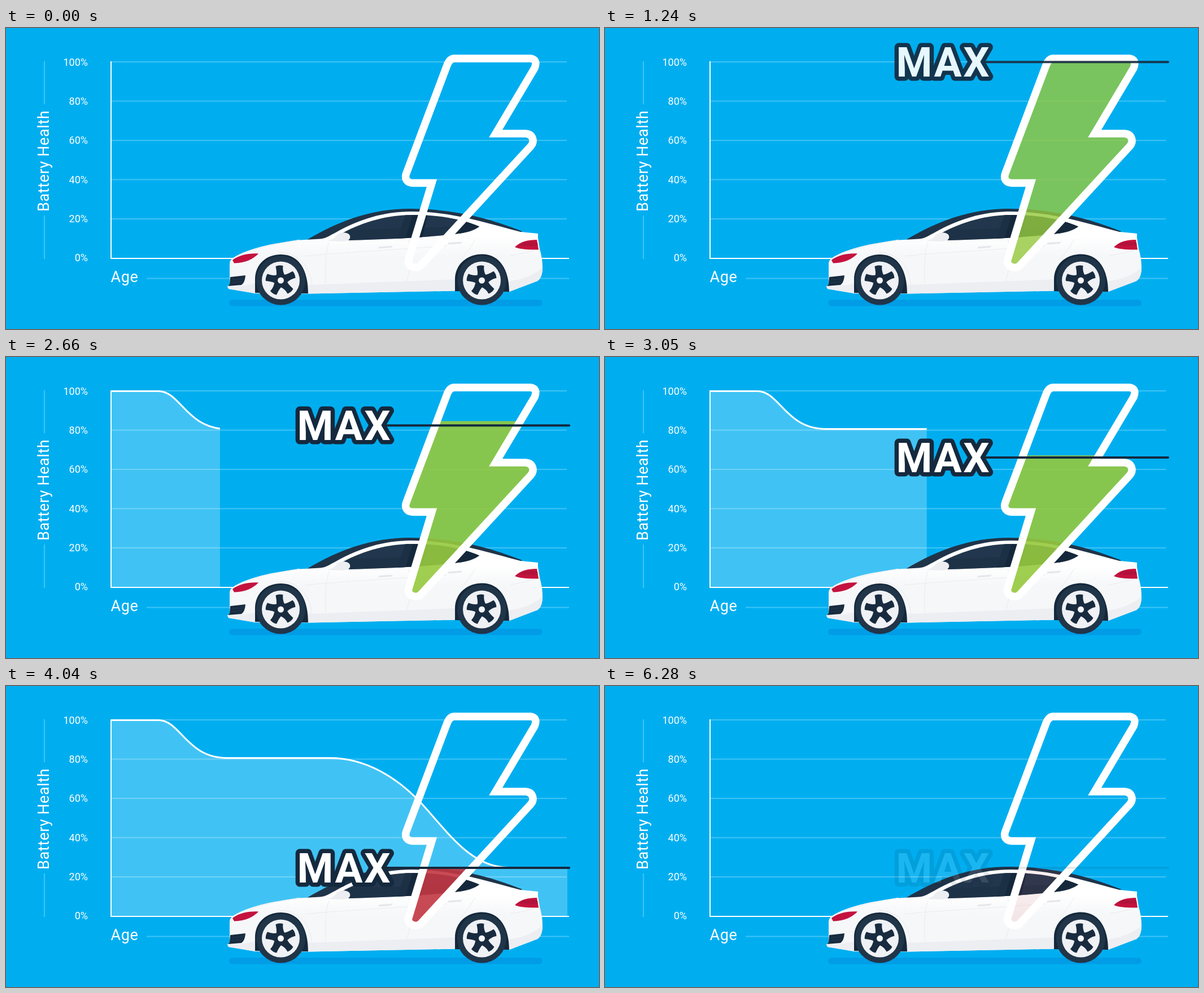
These frames come from a looping animation (1050x533 px, 6.31 s). An HTML page:

```html
<!DOCTYPE html>
<html lang="en">
<head>
<meta charset="utf-8">
<title>Battery Health by Age</title>
<style>
html, body { margin: 0; height: 100%; overflow: hidden; background: #00aef0; }
svg { display: block; width: 100%; height: 100%; font-family: Roboto, sans-serif; }
.title { font-size: 27px; letter-spacing: .6px; }
</style>
</head>
<body>
<svg viewBox="0 0 1050 533" fill="none">
  <defs>
    <path id="boltShape" d="M793 54H929Q942 56 936 71L867 187H920C934 188 936 202 929.5 209L735 420C727 429 709 422 713 410L754 274.5H721C710 274.5 705 267 709 257L781 66Q785 55 793 54Z"/>
    <path id="curve" d="M186 60.5H270C309 60.5 320 127.5 391 127.5H573C640 127.5 694 165 731 203C778 252 820 321.5 890 321.5H994"/>
    <clipPath id="reveal"><rect id="revealBox" y="40" height="368"/></clipPath>
    <clipPath id="level"><rect id="levelBox" x="690" width="270" height="500"/></clipPath>
    <clipPath id="glassClip"><use href="#glass"/></clipPath>
    <linearGradient id="paint" x2="0" y2="1">
      <stop offset=".3" stop-color="#fff"/><stop offset=".55" stop-color="#f6f7f9"/>
    </linearGradient>
    <g id="wheel">
      <circle r="43.5" fill="#213549"/>
      <circle r="33.5" fill="#eff1f4"/>
      <g id="blades" fill="#182b3f"><circle r="10.5"/></g>
      <circle r="5.500" fill="#f6f7f9"/>
    </g>
  </defs>

  <g id="grid" stroke="#fff" stroke-opacity=".25" stroke-width="2">
    <path d="M68 59V135M68 332V409M249 443.5H997"/>
  </g>
  <g id="labels" fill="#fff" font-size="18" text-anchor="end"></g>
  <text class="title" fill="#fff" x="185.500" y="450">Age</text>
  <text class="title" fill="#fff" transform="translate(76 325) rotate(-90)">Battery Health</text>

  <g id="chart" clip-path="url(#reveal)">
    <path id="area" fill="#fff" fill-opacity=".25"/>
    <use href="#curve" stroke="#fff" stroke-width="3"/>
  </g>
  <path stroke="#fff" stroke-width="2" d="M186 59V408H997"/>

  <!-- car -->
  <rect x="395" y="481" width="555" height="11.5" rx="5.75" fill="#009ce6"/>
  <path fill="#203449" d="M533 375C590 341 648 320 715 320C785 320 850 334 914 360L900 372L560 385Z"/>
  <path fill="url(#paint)" d="M396 455V418Q396 411 402 407C430 389 478 380 520 375.5L556 373.5C566 373 574 367 584 362C625 339 668 325 718 325C790 325 850 345 911 361L942 364V372L945 391Q950 408 950 424Q950 442 941 448L891 467L795 465.5L535 470.5L441 470L394 462L392 457Z"/>
  <path fill="#eceef2" d="M394 458L423 456L442 452V470L394 462L392 458ZM530 455L796 445V465.5L535 470.5ZM889 449C915 445 935 438 950 424Q950 442 941 448L891 467Z"/>
  <path id="glass" fill="#22374d" d="M596 363C635 342 677 331 720 331C770 331 808 339 838 351.5C831 358 815 363 797 364.5C735 372 670 374 607 376Z"/>
  <g clip-path="url(#glassClip)">
    <path fill="#172a3e" d="M590 358L850 350V380H590Z" opacity=".35"/>
    <path fill="#1c3045" d="M709 325H722L705 380H690Z"/>
    <path fill="#15283b" d="M722 325H748L735 380H705Z"/>
    <path fill="#15283b" d="M808 335L845 350L790 370Z"/>
  </g>
  <path fill="#eceef2" d="M568 377C577 375 581 373 585 367C591 360 607 361 609 368C611 376 602 378 594 378Z"/>
  <path stroke="#e9ebef" d="M572 380C565 397 566 420 566 453M713 374C720 400 718 424 709 449M520 375C470 383 430 393 410 405M530 404L560 401L780 386M831 374C824 386 817 397 805 410M893 403C914 400 930 396 944 391M542 462C541 424 521 399 486 397"/>
  <path fill="#e5e7eb" d="M661 387L685 385.5L682 389L659 390.5ZM784 380L808 378.5L805 382L782 383.5Z"/>
  <path fill="#c4123e" d="M401 411C413 402 430 398.5 447 399.5C438 409 424 416 404 416.5Z"/>
  <path fill="#c4123e" d="M901 388C911 378 924 375 940 375L943 392.5C926 393 911 392 901 388Z"/>
  <path fill="#9f1238" opacity=".5" d="M915 380C925 378 934 379 941 380L942 385Q925 386 908 385Z"/>
  <path fill="#182b3f" d="M397 441L424 438Q423 451 417 455L393 457L396 454Z"/>
  <path stroke="#25394f" d="M400 446L420 444M400 451L418 449"/>
  <path fill="#15283b" d="M441 469V446C441 417 462 401 487 401C518 401 535 428 535 470ZM795 466V446C795 417 818 400.500 843 400.500C874 400.500 891 428 891 467Z"/>
  <use href="#wheel" x="486.5" y="447"/>
  <use href="#wheel" x="842.5" y="447"/>

  <g id="charge" clip-path="url(#level)"><use href="#boltShape"/></g>
  <use href="#boltShape" stroke="#fff" stroke-width="13.5"/>
  <g id="marker">
    <path stroke="#15293e" stroke-width="4" stroke-linecap="round" d="M672 0H997"/>
    <text x="515.5" y="26" font-size="73" font-weight="700" letter-spacing="2.5" fill="#fff" stroke="#15293e" stroke-width="15" stroke-linejoin="round" paint-order="stroke">MAX</text>
  </g>
</svg>
<script>
const el = id => document.getElementById(id);
const add = (id, markup) => el(id).insertAdjacentHTML('beforeend', markup);
const clamp = (v, lo, hi) => Math.min(hi, Math.max(lo, v));

el('area').setAttribute('d', el('curve').getAttribute('d') + 'V408H186Z');
for (let i = 0; i < 6; i++) {
  const y = 60 + 69.5 * i;
  if (i < 5) add('grid', `<path d="M186 ${y}H993"/>`);
  add('labels', `<text x="145" y="${67 + 69.2 * i}">${100 - 20 * i}%</text>`);
}
for (let i = 0; i < 5; i++)
  add('blades', `<path transform="rotate(${72 * i})" d="M-9 -5C-6 -12 -8 -18 -9 -25Q-3 -28 4 -26C3 -18 5 -12 9 -6Z"/>`);

const LOOP = 6310, STEP = 30;
const GREEN = [150, 201, 62], RED = [194, 55, 66];

function draw(t) {
  const steps = (start, count) => clamp(Math.floor((t - start) / STEP) + 1, 0, count);
  const n = steps(2270, 60), out = steps(6040, 10);
  const alpha = steps(1000, 10) / 10 - out / 10;
  const mix = clamp((n - 40) / 20, 0, 1);

  el('marker').setAttribute('opacity', alpha);
  el('marker').setAttribute('transform', `translate(0 ${60.3 + 4.36 * n})`);
  el('charge').setAttribute('opacity', alpha * 0.9);
  el('charge').setAttribute('fill', `rgb(${GREEN.map((g, i) => g + (RED[i] - g) * mix)})`);
  el('levelBox').setAttribute('y', Math.min(48 + 4.68 * n, 324));
  el('revealBox').setAttribute('width', n ? 173.3 + 14.68 * n : 0);
  el('chart').setAttribute('opacity', Math.max(0, 1 - out / 9));
}

function tick() {
  draw(performance.now() % LOOP);
  requestAnimationFrame(tick);
}
tick();
</script>
</body>
</html>
```
